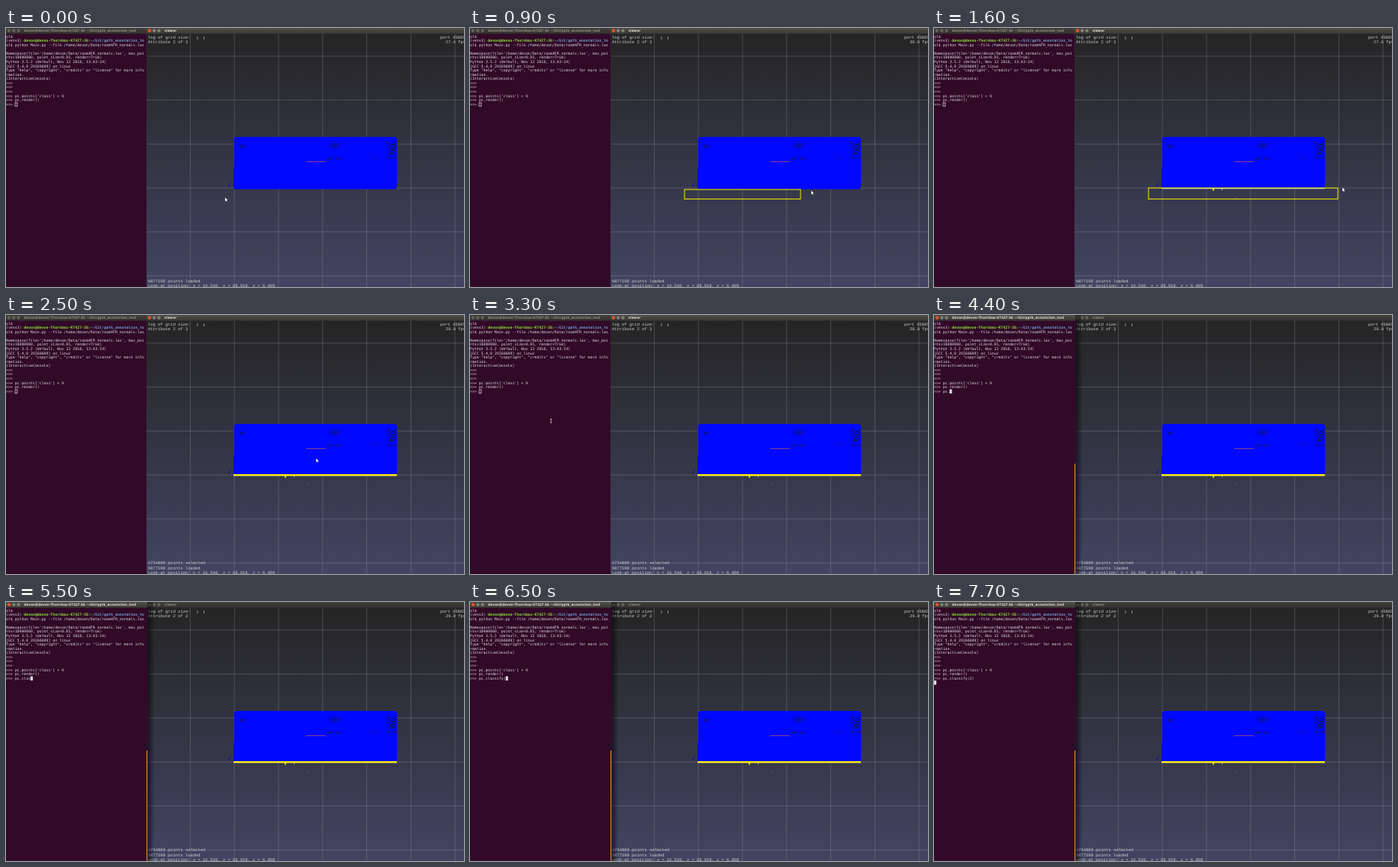
Recreate the animation shown at these times as an HTML page with a canvas. Size 600 px wide and 340 px high, loop 8 s.

```html
<!DOCTYPE html>
<html>
<head>
<meta charset="utf-8">
<style>
html, body { margin: 0; height: 100%; overflow: hidden; background: #000; }
canvas { display: block; }
</style>
</head>
<body>
<canvas id="stage" width="600" height="340"></canvas>
<script>
const c = document.getElementById('stage').getContext('2d');
const LOOP = 8000, STEP = 100, FOCUS = 3500, SELECT = 1600, RELEASE = 1700;
const CHAR = 2.92, ROW = 5.56, TOP = 11.4;
const MONO = '4.85px "DejaVu Sans Mono", monospace';
const BOLD = 'bold ' + MONO;
const TITLE = 'bold 4.75px "Open Sans", sans-serif';
const HUD = '5.45px "Liberation Mono", monospace';

const USER = 'devon@devon-Thornbox-KT427-36';
const LINES = [
  'ol$', '', 'ol$ python Main.py --file /home/devon/Data/room4FR_normals.las', '',
  "Namespace(file='/home/devon/Data/room4FR_normals.las', max_poi",
  'nts=10000000, point_size=0.01, render=True)',
  'Python 3.5.2 (default, Nov 12 2018, 13:43:14) ',
  '[GCC 5.4.0 20160609] on linux',
  'Type "help", "copyright", "credits" or "license" for more info',
  'rmation.', '(InteractiveConsole)', '>>> ', '>>> ', '>>> ',
  ">>> pc.points['class'] = 0", '>>> pc.render()'
];

// Typed command: when each character appears
const COMMAND = 'pc.classify(2)';
const KEYS = [3900, 4100, 4300, 4700, 5000, 5300, 5400, 5600, 5800, 5800, 5900, 6300, 6900, 7100];
const ENTER = 7700;

const FPS = [[0, '27.4'], [500, '28.6'], [900, '30.0'], [1300, '27.6'], [2200, '29.0'], [2900, '28.0'], [3600, '29.0']];
const POINTER = [[0, 287, 222.5], [200, 281, 224], [900, 447, 213.5], [1500, 535, 209.5], [2200, 535, 209.5], [3200, 106, 139]];
const CORNER = [[200, 281, 224.5], [900, 433, 212], [1500, 529, 210]];

function along(path, t) {
  let i = 0;
  while (i < path.length - 2 && t >= path[i + 1][0]) i++;
  const [a, b] = [path[i], path[i + 1]];
  const p = Math.min(1, Math.max(0, (t - a[0]) / (b[0] - a[0])));
  return [a[1] + (b[1] - a[1]) * p, a[2] + (b[2] - a[2]) * p];
}

function rect(color, x, y, w, h) {
  c.fillStyle = color;
  c.fillRect(x, y, w, h);
}

function text(s, x, y, color, font) {
  c.font = font;
  c.fillStyle = color;
  c.fillText(s, x, y);
}

function poly(color, points) {
  c.fillStyle = color;
  c.beginPath();
  points.forEach(p => c.lineTo(...p));
  c.fill();
}

function fade(x0, y0, x1, y1, a, b) {
  const g = c.createLinearGradient(x0, y0, x1, y1);
  g.addColorStop(0, a);
  g.addColorStop(1, b);
  return g;
}

function titleBar(x, w, label, active) {
  rect(fade(0, 0, 0, 7.5, active ? '#504e48' : '#3f3e3a', active ? '#3a3935' : '#33322f'), x, 0, w, 7.5);
  for (let i = 0; i < 3; i++) {
    c.fillStyle = !active ? '#66645e' : i ? '#85837b' : '#e9562a';
    c.beginPath();
    c.arc(x + 4 + i * 6.2, 3.6, 2.1, 0, 7);
    c.fill();
  }
  text(label, x + 23.5, 3.8, active ? '#e4e0d8' : '#918e86', TITLE);
}

// Gaps in the cloud: x, y, width, height, count, taper towards the bottom
function gaps() {
  let seed = 7;
  const rnd = () => (seed = seed * 16807 % 2147483647) / 2147483647;
  const patches = [
    [303, 152, 11, 5, 13, 1], [421, 150, 18, 7, 30, .5], [497, 149, 14, 17, 62, .6],
    [421, 169.5, 19, 2, 18, 0], [477, 169.5, 10, 1.5, 6, 0], [498, 169, 13, 2.5, 14, 0]
  ];
  for (const [x, y, w, h, n, taper] of patches)
    for (let i = 0; i < n; i++) {
      const v = rnd(), u = .5 + (rnd() - .5) * (1 - taper * v);
      rect('#15163f', x + u * w, y + Math.round(v * h), .7 + rnd() * 1.3, .8);
    }
  for (let i = 0; i < 7; i++) rect('#1212a0', 291 + rnd() * 6, 202 + rnd() * 5, 1.3, 1);
}

function viewer(t) {
  const x = 184, selected = t >= SELECT, focused = t < FOCUS;
  rect(fade(0, 7, 0, 340, '#252525', '#414562'), x, 7, 416, 333);
  for (let i = 0; i < 7; i++) rect('rgba(150,150,155,.33)', 240.9 + i * 57.8, 7, 1, 333);
  for (let i = 0; i < 6; i++) rect('rgba(150,150,155,.33)', x, 36.4 + i * 57.7, 416, 1);

  poly('#0008ff', [[301, 143], [510, 143], [512.3, 146], [512, 209], [510, 211.6], [298.3, 211.6], [298, 185], [299, 184], [299, 145]]);
  gaps();
  rect('#a8506e', 393, 175, 26, .8);
  if (selected) {
    const settled = t >= RELEASE;
    rect(settled ? '#fff000' : '#fff8a0', 298, settled ? 209 : 210, 214, settled ? 2.4 : 1.2);
    rect('#fff000', 365, 211, 2, 2.4);
    rect('#fff000', 377, 211, 1, 1.6);
    rect('#8080a0', 396, 222, 1, 1);
  }
  if (t >= 200 && t < RELEASE) {
    const [cx, cy] = along(CORNER, t);
    c.strokeStyle = '#e6e000';
    c.lineWidth = 1.1;
    c.strokeRect(281, cy, cx - 281, 224.5 - cy);
  }

  const hud = (s, px, y) => text(s, px, y, '#cfcfcf', HUD);
  hud('log of grid size:', 186, 13);
  rect('#aaa', 250.5, 11, .8, 4);
  rect('#aaa', 259, 11, .8, 4);
  hud('Attribute 2 of 3', 186, 19);
  hud('port 45865', 569, 13);
  hud(FPS.filter(f => f[0] <= t).pop()[1] + ' fps', 576, 19);
  if (t >= RELEASE) hud('1754860 points selected', 186, 326);
  hud('9877598 points loaded', 186, 332.2);
  hud('Look-at position: x = 16.548, y = 68.918, z = 6.000', 186, 338.3);
  titleBar(x, 416, 'viewer', focused);
}

function terminal(t) {
  const focused = t >= FOCUS, w = focused ? 185.5 : 184;
  if (focused) rect(fade(w, 0, w + 9, 0, 'rgba(0,0,0,.6)', 'rgba(0,0,0,0)'), w, 0, 9, 340);
  rect('#310a28', 0, 0, w, 340);
  titleBar(0, w, USER + ': ~/Git/pptk_annotation_tool', focused);
  if (focused) rect('#e0802c', 184, 195, 1.2, 145);

  const put = (s, col, row, color = '#e0dce0', font = MONO) => text(s, col * CHAR, TOP + row * ROW, color, font);
  LINES.forEach((s, i) => put(s, 0, i));
  put('(venv3)', 0, 1);
  put(USER, 8, 1, '#8ae234', BOLD);
  put(':', 37, 1);
  put('~/Git/pptk_annotation_to', 38, 1, '#729fcf', BOLD);

  const typed = KEYS.filter(k => k <= t).length, entered = t >= ENTER;
  put('>>> ' + COMMAND.slice(0, typed), 0, 16);
  const x = entered ? 0 : (4 + typed) * CHAR, y = TOP - 2.8 + (entered ? 17 : 16) * ROW;
  if (focused) rect('#e4dfe4', x, y, 3.1, 5.5);
  else {
    c.strokeStyle = '#d4ccd4';
    c.lineWidth = .8;
    c.strokeRect(x + .3, y + .4, 2.8, 4.8);
  }
}

function pointer(t) {
  if (t >= 3800) return;
  const [x, y] = along(POINTER, t);
  if (x < 184) {
    rect('#ddd', x - .3, y - 2.5, .8, 5);
    rect('#ddd', x - 1, y - 2.6, 2.2, .6);
    rect('#ddd', x - 1, y + 2, 2.2, .6);
  } else {
    const arrow = [[0, 0], [0, 4.8], [1.1, 3.9], [1.9, 5.4], [2.7, 5], [2, 3.5], [3.4, 3.4]];
    poly('#f4f4f4', arrow.map(([a, b]) => [x + a, y + b]));
  }
}

function draw(now) {
  const t = Math.floor(now % LOOP / STEP) * STEP;
  c.textBaseline = 'middle';
  c.textRendering = 'geometricPrecision';
  viewer(t);
  terminal(t);
  pointer(t);
  requestAnimationFrame(draw);
}
requestAnimationFrame(draw);
</script>
</body>
</html>
```
